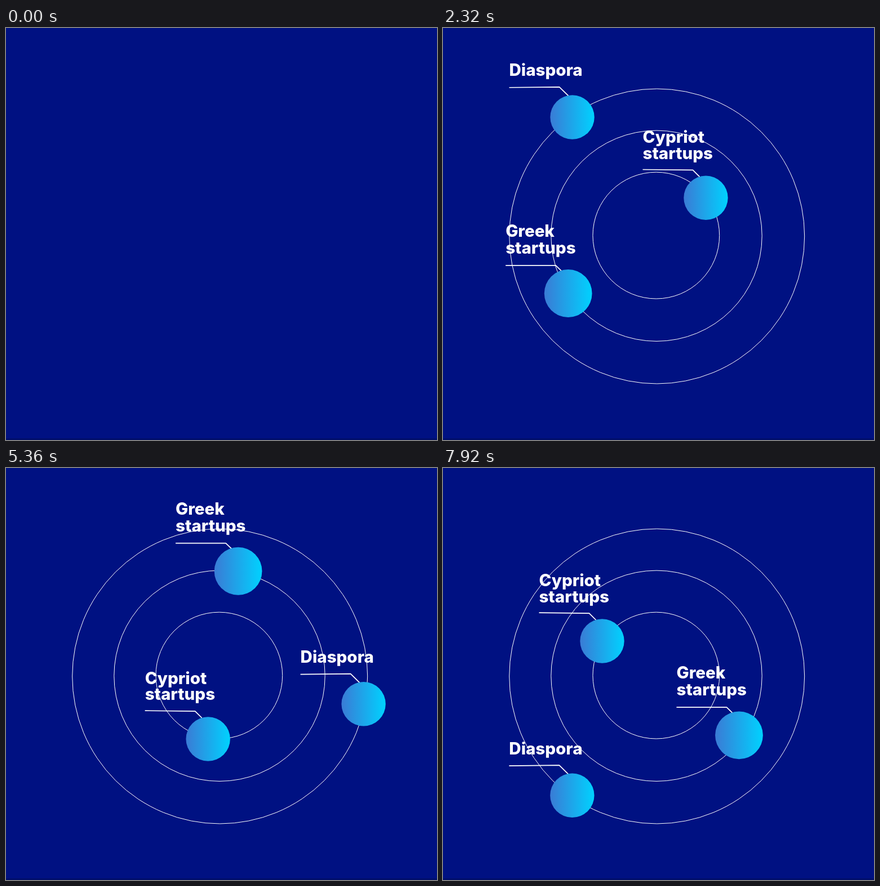
An HTML page for the animation above (8 s loop, 765 px wide and 732 px high).

```html
<!DOCTYPE html>
<html lang="en">
<head>
<meta charset="utf-8">
<title>Orbiting startups</title>
<style>
  html, body { margin: 0; width: 100%; height: 100%; overflow: hidden; background: #001182; }
  svg { display: block; width: 765px; height: 732px; }
  text { font: 800 29.5px Inter, "Open Sans", sans-serif; fill: #fff; }
  .ring { fill: none; stroke: #fff; stroke-width: 1; }
  .lead { fill: none; stroke: #fff; stroke-width: 1.7; }
</style>
</head>
<body>
<svg viewBox="0 0 765 732">
  <defs>
    <linearGradient id="ball">
      <stop offset="0" stop-color="#3a7bd5"/>
      <stop offset="1" stop-color="#00d2ff"/>
    </linearGradient>
  </defs>
  <rect y="729" width="765" height="3" fill="#000e6b"/>
  <g id="scene">
    <circle class="ring" cx="379.7" cy="370" r="262"/>
    <circle class="ring" cx="379" cy="369.3" r="187.2"/>
    <circle class="ring" cx="378.3" cy="368.6" r="112.4"/>
  </g>
</svg>
<script>
const LOOP = 8000, STEP = 80, APPEAR = 160;
const scene = document.getElementById('scene');

// Orbit centre, radius and angle at 1600 ms; label lines are [text, baseline].
const moons = [
  { x: 379.7, y: 370.2, orbit: 259.6, start: 202, r: 39.2,
    label: [['Diaspora', -73]], lead: '-112,-52.7 -23,-53.6 -6,-37' },
  { x: 376.5, y: 370, orbit: 112.9, start: 290.2, r: 39.2,
    label: [['Cypriot', -97.5], ['startups', -69]], lead: '-112,-50.3 -23,-49.4 -11,-37.5' },
  { x: 375, y: 365.5, orbit: 186, start: 112.6, r: 42.4,
    label: [['Greek', -100.5], ['startups', -70.5]], lead: '-111,-49.7 -22,-49.7 -11,-39' }
];

// Shared rotation: [time in ms, degrees turned], close to 45 degrees per second.
const turns = [[160, -64.8], [1600, 0], [3040, 65.3], [4000, 108.1],
               [5360, 168.9], [6800, 233.9], [7920, 283.4]];

function turnAt(t) {
  const i = Math.max(1, turns.findIndex(k => t <= k[0]));
  const [t0, a0] = turns[i - 1], [t1, a1] = turns[i];
  return a0 + (a1 - a0) * (t - t0) / (t1 - t0);
}

for (const m of moons) {
  const left = m.lead.split(',')[0];
  m.node = document.createElementNS('http://www.w3.org/2000/svg', 'g');
  m.node.innerHTML =
    `<polyline class="lead" points="${m.lead}"/>` +
    `<circle r="${m.r}" fill="url(#ball)"/>` +
    m.label.map(([s, y]) => `<text x="${left}" y="${y}">${s}</text>`).join('');
  scene.append(m.node);
}

function draw(now) {
  const t = Math.floor(now % LOOP / STEP) * STEP;
  scene.style.display = t < APPEAR ? 'none' : '';
  if (t >= APPEAR) {
    const turn = turnAt(t);
    for (const m of moons) {
      const a = (m.start + turn) * Math.PI / 180;
      const x = m.x + m.orbit * Math.cos(a), y = m.y + m.orbit * Math.sin(a);
      m.node.setAttribute('transform', `translate(${x.toFixed(2)} ${y.toFixed(2)})`);
    }
  }
  requestAnimationFrame(draw);
}
draw(performance.now());
</script>
</body>
</html>
```
